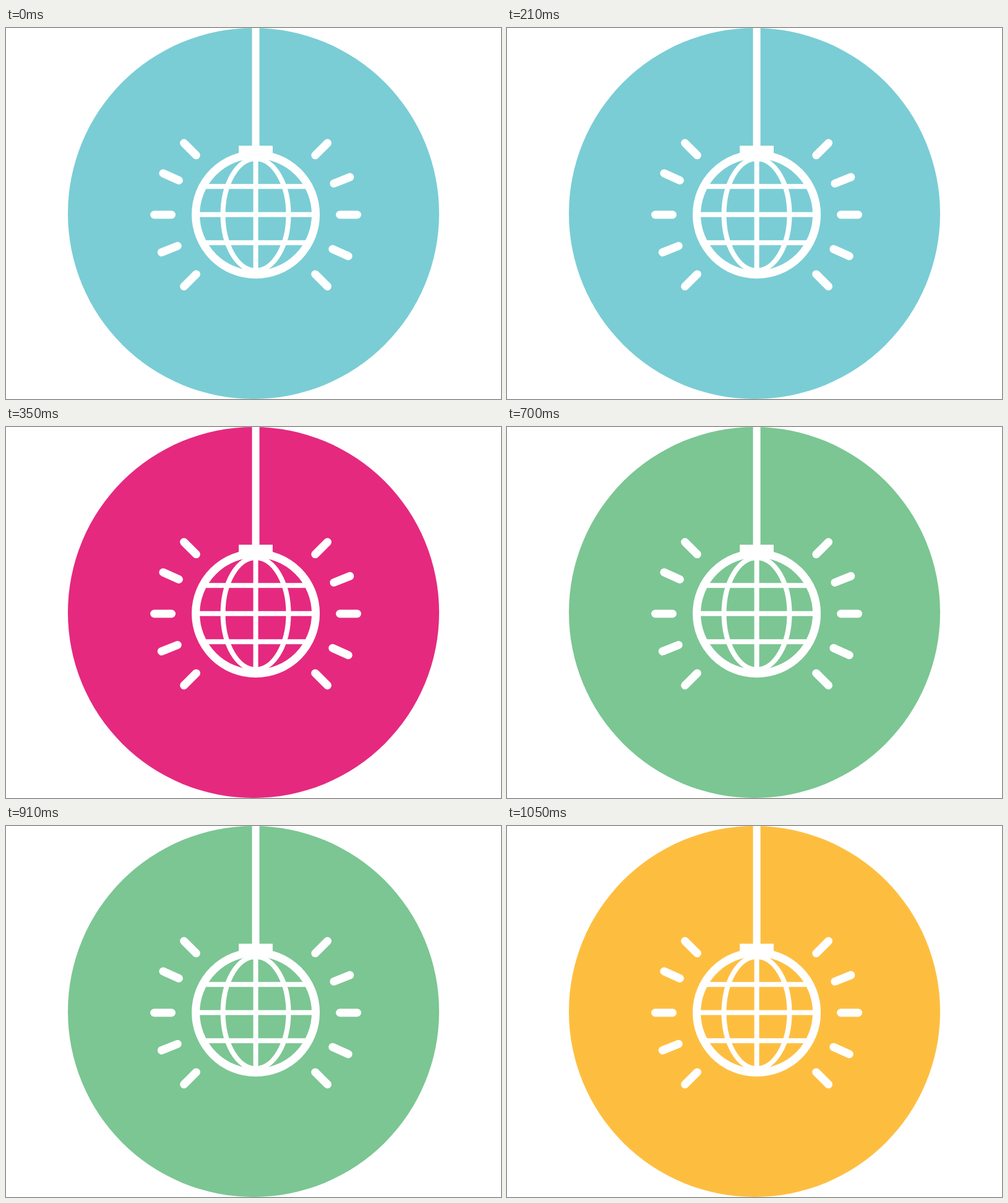
These frames come from a looping animation (800 px wide and 600 px high, 1.4 s). An HTML page with a canvas:

```html
<!DOCTYPE html>
<html lang="en">
<head>
<meta charset="utf-8">
<title>Disco ball</title>
<style>
  html, body { margin: 0; width: 100%; height: 100%; overflow: hidden; background: #fff; }
  canvas { display: block; }
</style>
</head>
<body>
<canvas id="stage" width="800" height="600"></canvas>
<script>
const ctx = document.getElementById('stage').getContext('2d');
const COLORS = ['#7acdd5', '#e5297f', '#7bc693', '#fdbe40'];
const STEP = 350;
const CX = 403.6, CY = 301.7;
const RAY_ANGLES = [-45, -21.8, 0, 24.1, 45];

function line(x1, y1, x2, y2, width, cap = 'butt') {
  ctx.lineWidth = width;
  ctx.lineCap = cap;
  ctx.beginPath();
  ctx.moveTo(x1, y1);
  ctx.lineTo(x2, y2);
  ctx.stroke();
}

function ring(rx, ry, width) {
  ctx.lineWidth = width;
  ctx.beginPath();
  ctx.ellipse(CX, CY, rx, ry, 0, 0, Math.PI * 2);
  ctx.stroke();
}

function drawBall() {
  const r = 97;
  ring(r, r, 13);
  ring(53, 90.5, 8);
  line(CX, CY - r, CX, CY + r, 8);
  for (const dy of [-45.5, 0, 45.5]) {
    const half = Math.sqrt(r * r - dy * dy);
    line(CX - half, CY + dy, CX + half, CY + dy, 8);
  }
}

// Every ray points away from the ball and has a twin on the opposite side
function drawRays() {
  const inner = 136, outer = 164;
  for (const deg of RAY_ANGLES) {
    const a = deg * Math.PI / 180;
    for (const side of [-1, 1]) {
      const ux = side * Math.cos(a), uy = side * Math.sin(a);
      line(CX + ux * inner, 302 + uy * inner, CX + ux * outer, 302 + uy * outer, 13, 'round');
    }
  }
}

function draw(color) {
  ctx.fillStyle = '#fff';
  ctx.fillRect(0, 0, 800, 600);
  ctx.fillStyle = color;
  ctx.beginPath();
  ctx.arc(400, 300, 300, 0, Math.PI * 2);
  ctx.fill();

  ctx.strokeStyle = ctx.fillStyle = '#fff';
  line(CX, 0, CX, 195, 12);
  ctx.fillRect(376.2, 190.4, 54.8, 12);
  drawBall();
  drawRays();
}

const start = performance.now();
function tick() {
  const step = Math.floor((performance.now() - start) / STEP);
  draw(COLORS[step % COLORS.length]);
  requestAnimationFrame(tick);
}
tick();
</script>
</body>
</html>
```
